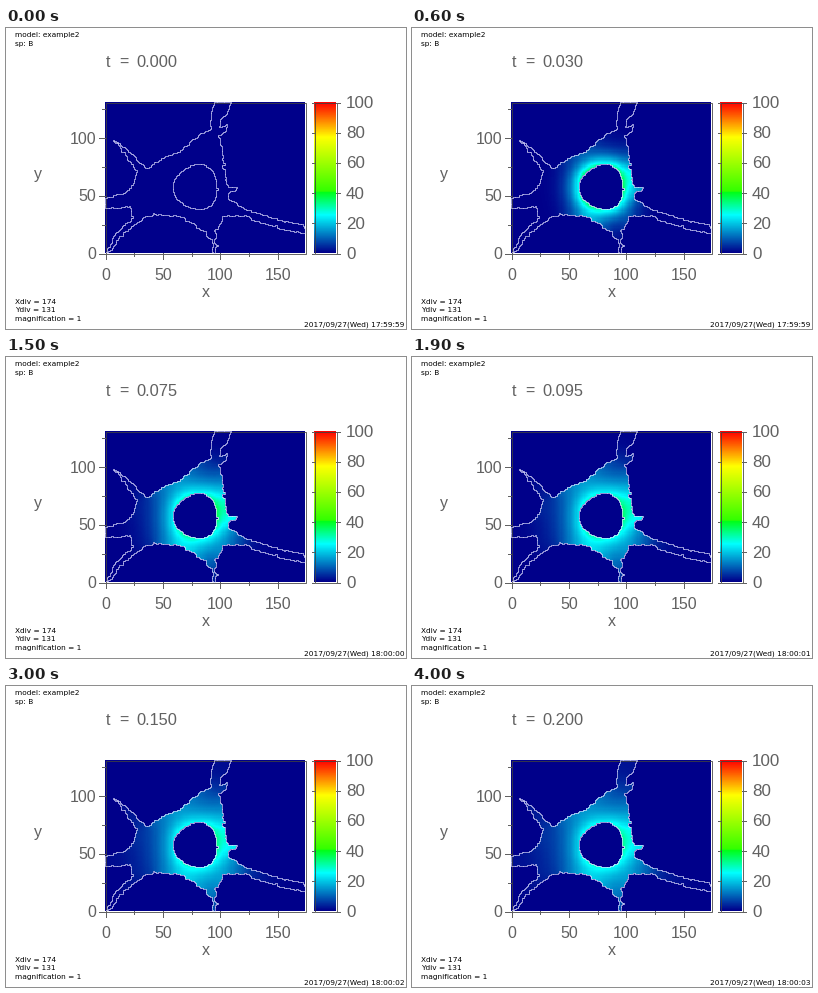
Animation of 400 by 301 pixels, one loop 4.1 s. Source, as a matplotlib script:

```python
import numpy as np
import matplotlib.pyplot as plt
from matplotlib.animation import FuncAnimation
from matplotlib.collections import LineCollection
from matplotlib.colors import LinearSegmentedColormap
from matplotlib.patches import Rectangle
from matplotlib.path import Path

W, H, DPI = 400, 301, 100
FRAMES, INTERVAL = 41, 100
NX, NY = 174, 131
LEFT, RIGHT, TOP, BOTTOM = 99, 299, 74, 225
BAR_L, BAR_R = 308, 330
PX = 72 / DPI  # one pixel in points
SX, SY = (RIGHT - LEFT) / NX, (BOTTOM - TOP) / NY
INK = "0.38"

# Key points of the cell membrane between its arms, in stage pixels
UPPER_LEFT = [
    (208, 74), (204, 93), (206, 100), (186, 112), (176, 122), (160, 128),
    (140, 140), (125, 125), (106, 110), (118, 126), (131, 143), (125, 160),
    (113, 167), (97, 169)]
LOWER_LEFT = [
    (97, 180), (125, 179), (127, 189), (108, 207), (100, 224), (106, 220),
    (113, 209), (134, 192), (147, 185), (178, 190), (199, 204), (206, 214),
    (207, 228)]
LOWER_RIGHT = [
    (210, 228), (210, 203), (219, 188), (240, 188), (260, 196), (299, 207),
    (298, 197), (270, 191), (240, 181), (223, 171)]
UPPER_RIGHT = [
    (221, 166), (232, 160), (221, 160), (218, 144), (216, 120), (213, 108),
    (227, 94), (214, 99), (214, 92), (222, 84), (224, 72)]


def rough(points, amount, rng):
    """Subdivide a closed outline and shake it slightly."""
    out = []
    for p, q in zip(points, points[1:] + points[:1]):
        p, q = np.array(p, float), np.array(q, float)
        n = max(1, int(np.hypot(*(q - p)) / 2.5))
        out += [p + (q - p) * k / n + rng.normal(0, amount, 2)
                for k in range(n)]
    return out


def nucleus_outline():
    a = np.linspace(0, 2 * np.pi, 90)
    r = 22.2 + 1.3 * np.cos(a + np.pi / 4) + 1.2 * np.cos(3 * (a - 1.13))
    return np.c_[189 + r * np.cos(a), 158 - r * np.sin(a)]


def fill(points):
    gx, gy = np.meshgrid(LEFT + (np.arange(NX) + .5) * SX,
                         TOP + (np.arange(NY) + .5) * SY)
    inside = Path(points).contains_points(np.c_[gx.ravel(), gy.ravel()])
    return inside.reshape(NY, NX)


def edges(mask):
    """Grid edges that separate inside from outside."""
    m = np.pad(mask, 1).astype(int)
    segs = []
    for r, c in np.argwhere(np.diff(m, axis=1)[1:-1]):
        x, y = LEFT + c * SX, TOP + r * SY
        segs.append([(x, y), (x, y + SY)])
    for r, c in np.argwhere(np.diff(m, axis=0)[:, 1:-1]):
        x, y = LEFT + c * SX, TOP + r * SY
        segs.append([(x, y), (x + SX, y)])
    return segs


rng = np.random.default_rng(4)
membrane = UPPER_LEFT + LOWER_LEFT + LOWER_RIGHT + UPPER_RIGHT
cell = fill(rough(membrane, .7, rng))
nucleus = fill(nucleus_outline())
cyto = cell & ~nucleus


def diffuse(rate=17, decay=.05, burst=2.7, fade=5, substeps=80):
    """Release at the nuclear membrane, strongest at first, then spreading."""
    n = np.pad(nucleus, 1).astype(float)
    source = cyto * (n[:-2, 1:-1] + n[2:, 1:-1] + n[1:-1, :-2] + n[1:-1, 2:])
    open_x = (cyto[:, 1:] & cyto[:, :-1]) * rate / substeps
    open_y = (cyto[1:] & cyto[:-1]) * rate / substeps
    u = np.zeros((NY, NX))
    states = [u.copy()]
    for i in range(FRAMES - 1):
        release = source * (1 + burst * np.exp(-i / fade)) / substeps
        for _ in range(substeps):
            fx = open_x * (u[:, 1:] - u[:, :-1])
            fy = open_y * (u[1:] - u[:-1])
            u *= 1 - decay / substeps
            u += release
            u[:, :-1] += fx
            u[:, 1:] -= fx
            u[:-1] += fy
            u[1:] -= fy
        states.append(u.copy())
    states = np.array(states) * 26 / np.median(u[source > 0])
    return np.minimum(states, 46)


field = diffuse()

cmap = LinearSegmentedColormap.from_list("heat", [
    (0, (0, 0, .545)), (.25, (0, 1, 1)), (.4, (0, 1, .1)), (.41, (.2, 1, 0)),
    (.77, (1, 1, 0)), (1, (1, 0, 0))], N=512)

# ---- stage ----
fig = plt.figure(figsize=(W / DPI, H / DPI), dpi=DPI, facecolor="white")
ax = fig.add_axes([0, 0, 1, 1])
ax.axis("off")


def picture(data, x0, x1):
    return ax.imshow(data, cmap=cmap, vmin=0, vmax=100, aspect="auto",
                     interpolation="nearest", extent=(x0, x1, BOTTOM, TOP))


def lines(segs, color, width=1, crisp=False):
    ax.add_collection(LineCollection(segs, colors=color, zorder=4,
                                     linewidths=width * PX,
                                     antialiaseds=not crisp))


def label(x, y, text, size=16, ha="left"):
    """Large lettering with its digits centred on y."""
    return ax.text(x, y + .35 * size, text, family="Liberation Sans",
                   size=size * PX, color=INK, ha=ha, va="baseline")


def note(x, base, text):
    return ax.text(x, base, text, family="DejaVu Sans", size=7.4 * PX,
                   color="black", va="baseline")


heat = picture(field[0], LEFT, RIGHT)
picture(np.linspace(100, 0, 151)[:, None], BAR_L, BAR_R)
for x0, x1 in ((LEFT, RIGHT), (BAR_L, BAR_R)):
    ax.add_patch(Rectangle((x0 + .5, TOP + .5), x1 - x0, BOTTOM - TOP,
                           fill=False, ec="0.25", lw=.8 * PX, zorder=3))
lines(edges(cell) + edges(nucleus), (.88, .88, 1), .8)

ticks = []
for v in range(0, 151, 25):
    major = v % 50 == 0
    size = 6 if major else 3
    x, y = LEFT + .5 + v * SX, BOTTOM + .5 - v * SY
    ticks.append([(x, BOTTOM), (x, BOTTOM + size)])
    if major:
        label(x, 246.5, str(v), ha="center")
    if v < NY:
        ticks.append([(LEFT - size, y), (LEFT, y)])
        if major:
            label(90, y, str(v), ha="right")
for v in range(0, 101, 20):
    y = BOTTOM + .5 - v * (BOTTOM - TOP) / 100
    ticks += [[(BAR_L - 2, y), (BAR_L, y)], [(BAR_R, y), (BAR_R + 4, y)]]
    label(340, y - .5, str(v), 17)
lines(ticks, INK, crisp=True)

label(199.5, 263.4, "x", ha="center")
label(32, 145.4, "y", ha="center")
label(100, 33.2, "t")
label(113, 33.2, "=")
clock = label(130, 33.2, "", 16.4)

note(9, 9.5, "model: example2")
note(9, 18, "sp: B")
note(9, 276, "Xdiv = 174")
note(9, 284.5, "Ydiv = 131")
note(9, 293, "magnification = 1")
stamp = note(298, 298.5, "")

ax.set_xlim(0, W)
ax.set_ylim(H, 0)


def draw(i):
    heat.set_data(field[i])
    clock.set_text(f"{i * .005:.3f}")
    s = 17 * 3600 + 59 * 60 + 59 + (i + 3) // 10
    stamp.set_text(
        f"2017/09/27(Wed) {s // 3600}:{s // 60 % 60:02d}:{s % 60:02d}")
    return heat, clock, stamp


anim = FuncAnimation(fig, draw, frames=FRAMES, interval=INTERVAL, repeat=True)
plt.show()
```
